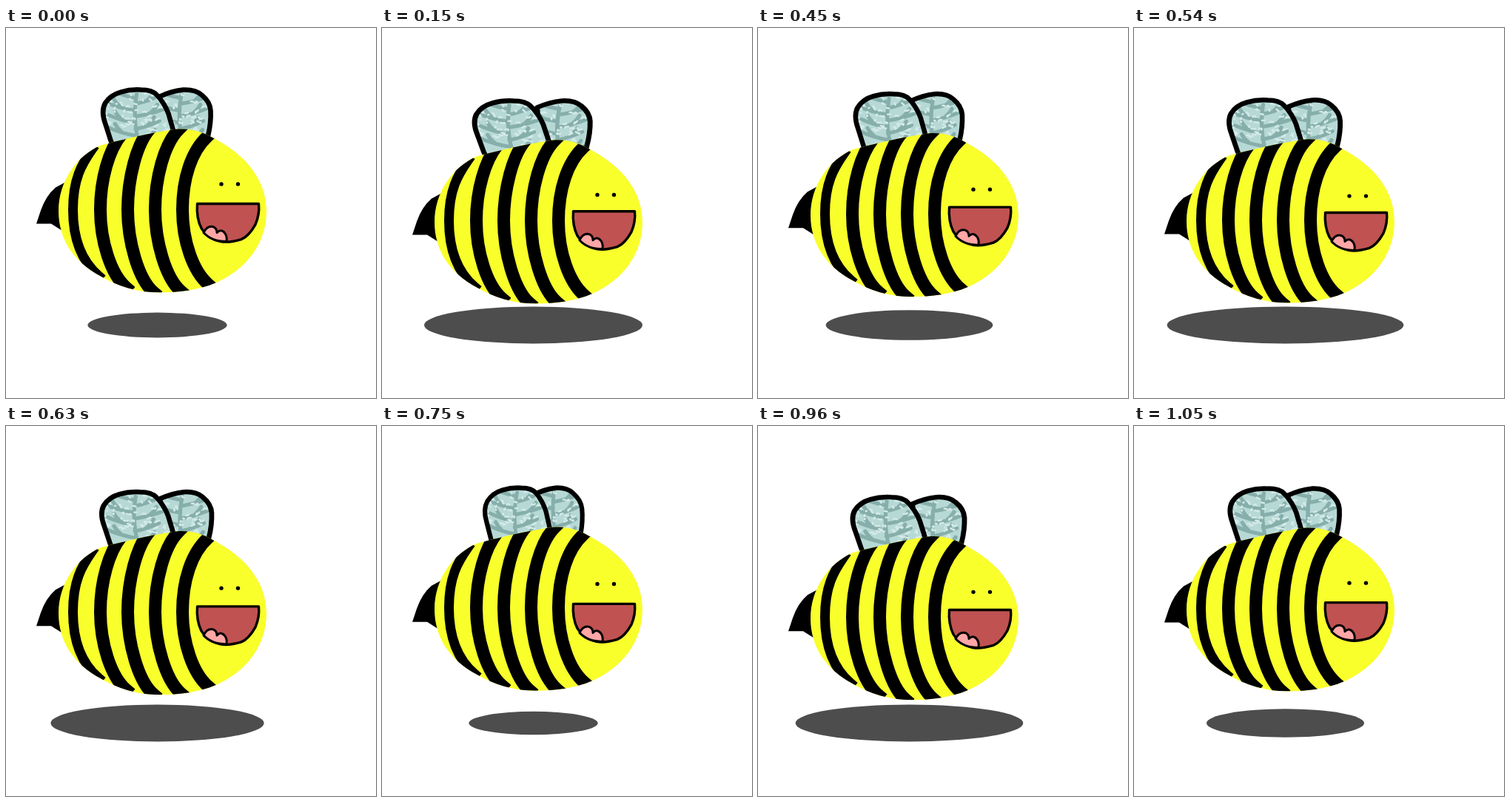
Recreate the animation shown at these times as an HTML page. Size 500 by 500 pixels, loop 1.08 s.

```html
<!DOCTYPE html>
<html lang="en">
<head>
<meta charset="utf-8">
<title>Bouncing bee</title>
<style>
html, body { margin: 0; width: 100%; height: 100%; overflow: hidden; background: #fff; }
svg { display: block; width: 100vw; height: 100vh; }
path { stroke-linecap: round; stroke-linejoin: round; }
.line { fill: none; stroke: #000; stroke-width: 6.5; }
.vein { fill: none; stroke: #86aeab; stroke-width: 5; }
.glint { fill: none; stroke: #d3eae8; stroke-width: 2.4; }
#stripes path { fill: none; stroke: #000; stroke-linecap: square; }
</style>
</head>
<body>
<svg viewBox="0 0 500 500">
  <defs>
    <path id="shape" d="M71 249C71 208 96 174 128 160C158 152 200 142 232 138C250 137 264 141 280 150C325 173 352 208 352 249C352 292 325 328 283 346C262 355 235 359 207 359C178 359 150 350 128 337C92 318 71 287 71 249Z"/>
    <clipPath id="bodyClip"><use href="#shape"/></clipPath>
  </defs>
  <ellipse id="shadow" cx="204.5" cy="401.5" fill="#4d4d4d"/>
  <g id="wings"></g>
  <g id="body">
    <path d="M80 210L67 217Q54 228 47 248L41 266L61 266L80 278Z"/>
    <use href="#shape" fill="#f9ff2b"/>
    <g id="stripes" clip-path="url(#bodyClip)"></g>
  </g>
  <g id="eyes"><circle r="2.7"/><circle cx="22.5" r="2.7"/></g>
  <g id="mouth" stroke="#000">
    <path d="M258.5 240H341.5Q343 254 337 268Q328 284 318 288Q302 293 290 291Q272 287 264 273Q257 259 258.5 240Z" fill="#c05252" stroke-width="3.4"/>
    <path d="M267 279Q272 269 280 271Q285 273 285 279Q291 273 296 280Q299 284 298 291Q278 291 267 279Z" fill="#ffa6a6" stroke-width="3"/>
  </g>
</svg>
<script>
const $ = id => document.getElementById(id);
const STEP = 30, STEPS = 36, BOUNCES = 3;

let seed = 7;
const rand = () => (seed = seed * 16807 % 2147483647) / 2147483647;
const spread = (mid, r) => mid + (rand() * 2 - 1) * r;

// Wings: a shape filled with branching veins and random flecks
function flecks(cx, cy, count) {
  let d = "";
  for (let i = 0; i < count; i++)
    d += `M${spread(cx, 46)} ${spread(cy, 38)}q${spread(0, 3)} ${spread(0, 3)} ${spread(0, 5)} ${spread(0, 2)}`;
  return d;
}

function veins(x, base, top) {
  let d = `M${x} ${base}Q${x - 8} ${(base + top) / 2} ${x - 2} ${top}`;
  for (let y = base - 4; y > top; y -= 17)
    for (const side of [-1, 1]) {
      const len = side * spread(36, 8), fork = y + side * 4;
      d += `M${x - 4} ${fork}q${len / 2} -3 ${len} -11`;
      d += `M${x - 4 + len / 2} ${fork - 5}q${side * 6} -5 ${side * 9} -11`;
    }
  return d;
}

function wing(id, outline, cx) {
  return `<g id="${id}"><clipPath id="${id}Clip"><path d="${outline}"/></clipPath>
    <g clip-path="url(#${id}Clip)"><path d="${outline}" fill="#b7d9d6"/>
    <path class="vein" d="${veins(cx, 154, 90)}"/>
    <path class="glint" d="${flecks(cx, 120, 80)}"/></g>
    <path class="line" d="${outline}"/></g>`;
}

$("wings").innerHTML =
  wing("right", "M216 165L207 93Q222 86 238 84Q254 83 263 91Q274 100 275 112Q276 128 272 146L268 172", 238) +
  wing("left", "M152 175L143 153L136 130Q130 113 136 102Q143 91 157 87Q170 83 184 84Q199 84 205 91Q215 102 220 116L226 138L230 165", 180);

// Stripes: evenly spaced bows whose ends follow the rounded rim of the body
const rim = x => 107 * Math.sqrt(1 - ((x - 211.5) / 140.5) ** 2);

function stripe(i) {
  const x = 90.5 + 37 * i, top = x + 26 + 2 * i, end = x + 35;
  const topY = 244 - rim(top), endY = 252 + rim(end);
  return `<path stroke-width="${i ? 17 : 13}" d="M${top} ${topY}C${x + 12} ${topY + 20} ${x} 205 ${x} 247S${x + 14} ${endY - 18} ${end} ${endY}"/>`;
}
for (let i = 0; i < 5; i++) $("stripes").innerHTML += stripe(i);

const place = (id, value) => $(id).setAttribute("transform", value);

// Widens a wing away from its hinge and leans it outwards
function flapWing(id, hinge, flap, side) {
  const grow = .09 * flap, lean = side * .06 * flap;
  place(id, `matrix(${1 + grow} 0 ${lean} 1 ${-grow * hinge - lean * 152} 0)`);
}

function draw(now) {
  const step = Math.floor(now / STEP) % STEPS;
  // Quick waves follow each bounce, slow ones drift once per loop
  const wave = (turns, peak) => Math.cos(2 * Math.PI * turns * (step - peak) / STEPS);
  const quick = peak => wave(BOUNCES, peak), slow = peak => wave(1, peak);

  const bottom = 364.5 + 8.5 * quick(5.9) + 1.8 * slow(33);
  const flap = .3 + .5 * slow(8) + .42 * quick(8);

  place("body", `translate(0 ${bottom - 359})`);
  place("wings", `translate(0 ${bottom - 358})`);
  flapWing("left", 228, flap, 1);
  flapWing("right", 207, flap, -1);
  place("eyes", `translate(291 ${bottom - 145.5 - 1.5 * slow(4)})`);
  place("mouth", `translate(0 ${bottom - 361 - 2 * slow(6) - 2 * quick(6)})`);

  const rx = 127 + 36 * quick(7) + 5 * slow(11);
  $("shadow").setAttribute("rx", rx);
  $("shadow").setAttribute("ry", Math.min(25, rx * .18));
}

const start = performance.now();
function tick() {
  draw(performance.now() - start);
  requestAnimationFrame(tick);
}
tick();
</script>
</body>
</html>
```
